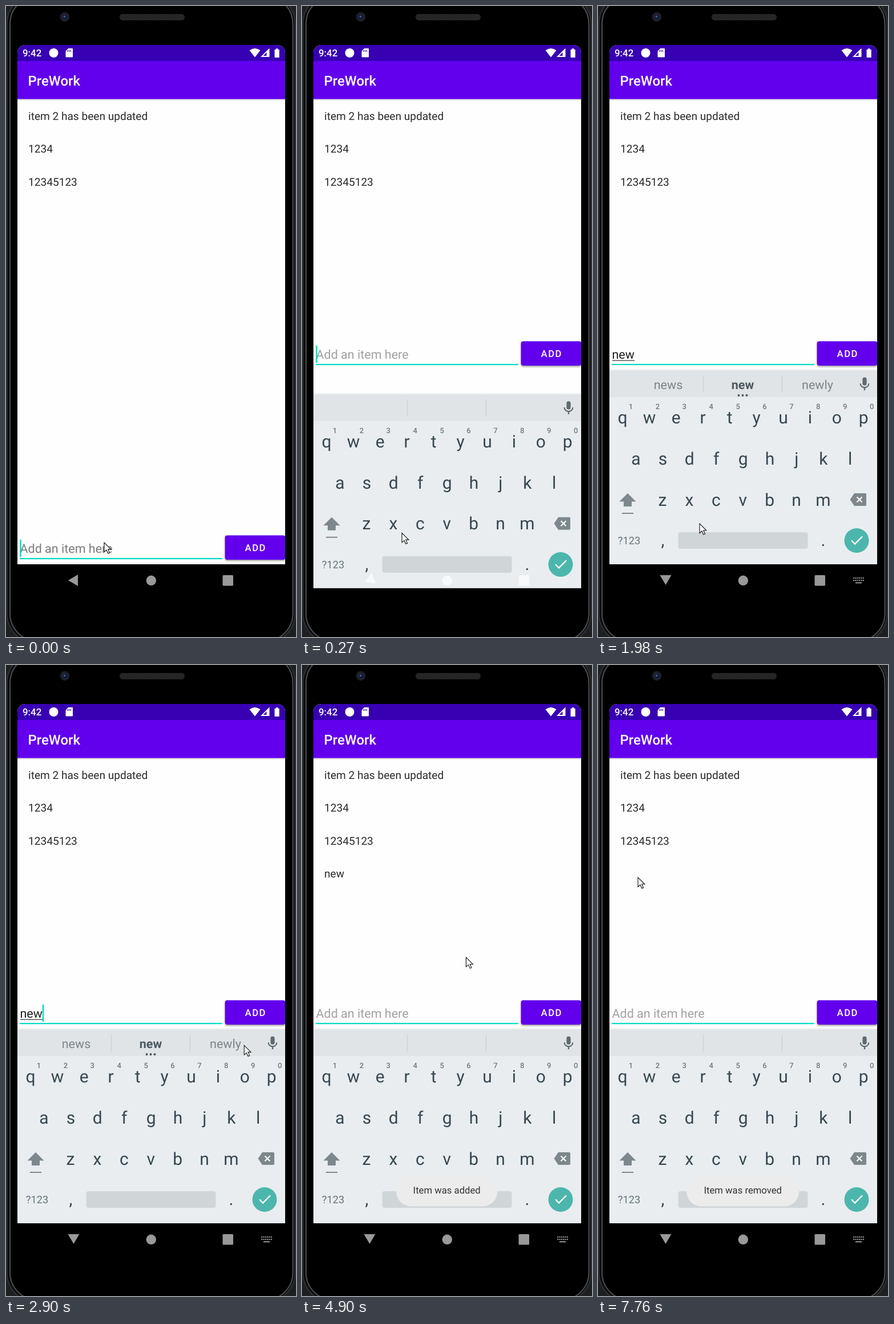
An HTML page for the animation above (8 s loop, 508 px wide and 1102 px high).

```html
<!DOCTYPE html>
<html lang="en">
<head>
<meta charset="utf-8">
<title>List app</title>
<style>
  html, body { margin: 0; width: 100%; height: 100%; overflow: hidden; background: #000; }
  svg { display: block; width: 508px; height: 1102px; font-family: Roboto, sans-serif; text-rendering: geometricPrecision; }
  .mid { text-anchor: middle; }
  .item { font-size: 19.1px; fill: #2a2a2a; }
  .key { font-size: 30px; fill: #37474f; }
  .digit { font-size: 13px; font-weight: 500; fill: #71797d; }
  .word { font-size: 21.5px; fill: #7b8488; }
  .word.best { font-weight: 700; fill: #4d5a60; }
</style>
</head>
<body>
<svg viewBox="0 0 508 1102" xmlns="http://www.w3.org/2000/svg">
  <defs>
    <clipPath id="screen"><path d="M20 1032V82a14 14 0 0 1 14-14H475a14 14 0 0 1 14 14V1032z"/></clipPath>
    <pattern id="mesh" width="4" height="4" patternUnits="userSpaceOnUse">
      <rect width="4" height="4" fill="#1b1b1b"/>
      <path d="M0 0h2v2h-2zM2 2h2v2h-2z" fill="#303030"/>
    </pattern>
    <linearGradient id="fade" x2="0" y2="1">
      <stop stop-color="#000" stop-opacity=".2"/><stop offset="1" stop-color="#000" stop-opacity="0"/>
    </linearGradient>
    <filter id="soft" x="-10%" y="-20%" width="120%" height="150%"><feGaussianBlur stdDeviation="1.5"/></filter>
  </defs>

  <!-- phone body -->
  <rect width="508" height="1102" fill="#1d1f21"/>
  <rect x="1.5" y="-22" width="505" height="1136" rx="54" fill="#0b0c0d" stroke="#303235" stroke-width="2"/>
  <rect x="7" y="-17" width="495.5" height="1126" rx="48" stroke="#4b4e52" stroke-width="2"/>
  <circle cx="103" cy="19" r="8.5" fill="#1b1c1f"/>
  <circle cx="103" cy="19" r="5" fill="#10172b" stroke="#2b3350"/>
  <circle cx="102.5" cy="18.5" r="2" fill="#40518a"/>
  <rect x="199" y="14" width="114" height="11" rx="5.5" fill="url(#mesh)"/>

  <g clip-path="url(#screen)">
    <rect x="20" y="68" width="469" height="907" fill="#fefefe"/>
    <rect x="20" y="162" width="469" height="4" fill="url(#fade)"/>
    <rect x="20" y="68" width="469" height="28" fill="#3700b3"/>
    <rect x="20" y="96" width="469" height="66.5" fill="#6200ee"/>
    <g fill="#fff">
      <text x="29" y="88" font-size="16.9" font-weight="500">9:42</text>
      <circle cx="83.5" cy="82" r="8"/>
      <path d="M109 74h7q1 0 1 1v13.5q0 1-1 1h-10.5q-1 0-1-1v-9.5z"/>
      <path d="M108 77v3M110.7 77v3M113.4 77v3" stroke="#3700b3" stroke-width="1.2"/>
      <path d="M426.5 77.5Q436 70.5 445.5 77.5L436 89.5z"/>
      <path d="M461.5 73.5v15.5h-15.5z"/>
      <path d="M456.5 81v6h-6z" fill="#3700b3"/>
      <path d="M470.5 76h2.3v-1.8h3.6v1.8h2.3v14h-8.2z"/>
      <text x="38.5" y="139" font-size="23.9" font-weight="500">PreWork</text>
    </g>
    <text class="item" x="39" y="199">item 2 has been updated</text>
    <text class="item" x="39" y="256">1234</text>
    <text class="item" x="39" y="314">12345123</text>
    <text class="item" x="39" y="371" id="added">new</text>

    <g id="entry">
      <text id="hint" x="24.5" y="616" font-size="21.5">Add an item here</text>
      <text id="typed" x="24.5" y="616" font-size="21.5" fill="#212121"></text>
      <rect id="compose" x="25" y="618.5" width="39" height="1.2" fill="#333"/>
      <rect x="24" y="625" width="355" height="2.2" fill="#03dac5"/>
      <rect id="caret" y="593" width="2.5" height="30" fill="#03dac5"/>
      <rect x="384" y="588" width="105" height="42" rx="4" opacity=".4" filter="url(#soft)"/>
      <rect id="button" x="383.5" y="585.5" width="106" height="42.5" rx="4"/>
      <text class="mid" x="437.3" y="613" font-size="16.7" font-weight="500" letter-spacing="1.5" fill="#fff">ADD</text>
    </g>
    <rect x="20" y="975" width="469" height="57"/>

    <g id="board">
      <rect x="20" y="634" width="469" height="3" fill="#f1f3f4"/>
      <rect x="20" y="636.5" width="469" height="338.5" fill="#e9edf0"/>
      <rect x="20" y="636.5" width="469" height="46.5" fill="#e0e4e7"/>
      <path d="M184.5 646v29M322.5 646v29" stroke="#c9ced1" stroke-width="1.2"/>
      <path transform="translate(452.6 646) scale(1.2)" fill="#5f6a6f" d="M12 14a3 3 0 0 0 3-3V5a3 3 0 0 0-6 0v6a3 3 0 0 0 3 3zm5.3-3a5.3 5.1 0 0 1-10.6 0H5c0 3.4 2.7 6.2 6 6.7V21h2v-3.3c3.3-.5 6-3.3 6-6.7z"/>
      <g id="words" class="mid">
        <text class="word" x="123" y="669">news</text>
        <text class="word best" x="253.5" y="669">new</text>
        <text class="word" x="384.5" y="669">newly</text>
        <path d="M246.500 680h15" stroke="#4d5a60" stroke-width="4" stroke-linecap="round" stroke-dasharray="0 7"/>
      </g>
      <g id="keys" class="mid"></g>
      <g fill="#7d888c">
        <path d="M52 851L66.500 865.500h-7.500v8.500h-14v-8.500h-7.500z"/>
        <path d="M42 885h20v2h-20z"/>
        <path d="M441.5 862l7.5-11h19q2 0 2 2v18q0 2-2 2h-19z"/>
      </g>
      <path d="M453.5 857.5l9 9m0-9l-9 9" stroke="#fff" stroke-width="2.2"/>
      <text class="mid" x="54.5" y="940" font-size="18.3" fill="#69757a">?123</text>
      <rect x="140.5" y="919" width="227" height="29" rx="4" fill="#d0d5d8"/>
      <circle cx="453" cy="933.5" r="21.5" fill="#4db6ac"/>
      <path d="M444 933.5l6 6L463 926.500" fill="none" stroke="#fff" stroke-width="2.3"/>
    </g>

    <g id="nav">
      <path id="back" d="M-9 0L8-10V10z"/>
      <circle cx="254.3" cy="1003.300" r="8.7"/>
      <rect x="379.5" y="994" width="18.5" height="18.5" rx="1.5"/>
      <g id="switch">
        <path fill="none" stroke="currentColor" stroke-width="2" d="M447 999h19M447 1003h19" stroke-dasharray="2.2 1.15"/>
        <path d="M451 1006.3h11v2h-11z"/>
      </g>
    </g>
    <g id="toast">
      <rect id="pill" y="893" height="52.5" rx="26" fill="#ebeceb"/>
      <text id="message" class="mid" x="253.7" y="923" font-size="16.7" fill="#333"></text>
    </g>
  </g>
  <path id="mouse" d="M0 0V16.500L4 13L6.800 19L9.500 18L6.800 11.800H11.800z" fill="#fff" stroke="#111" stroke-width="1.1"/>
</svg>
<script>
const LOOP = 8000, TAP = 120, OPEN = 540, TYPE = 1130, SUGGEST = 1550, ADD = 3400, REMOVE = 6630;
const BLINK = 485, PITCH = 46.9;
const $ = id => document.getElementById(id);
const set = (id, name, value) => $(id).setAttribute(name, value);
const show = (id, on) => set(id, "opacity", +on);
const within = (t, a, b) => t >= a && t < b;
const clamp = v => Math.min(1, Math.max(0, v));
const easeOut = p => 1 - (1 - p) ** 3;

// Pointer strokes: start, end, target x, target y
const strokes = [
  [200, OPEN, 178, 904], [2510, 2900, 417, 665], [2900, 3150, 432, 608],
  [ADD, 3680, 349, 582], [3680, 4650, 288, 511], [4900, 6070, 70, 371]
];

function pointerAt(t) {
  let x = 172, y = 937;
  for (const [from, to, tx, ty] of strokes) {
    const p = easeOut(clamp((t - from) / (to - from)));
    x += (tx - x) * p;
    y += (ty - y) * p;
  }
  return `translate(${x} ${y})`;
}

// The caret restarts its blink on focus, typing and clearing
function caretOn(t) {
  const since = t - (t < 1495 ? 55 : t < ADD ? 1495 : 3395);
  return since < 0 || Math.floor(since / BLINK) % 2 === 0;
}

function toastAlpha(age) {
  return clamp(Math.min(age, 2030 - age) / 270);
}

const label = (text, x, y, cls) => `<text class="${cls}" x="${x}" y="${y}">${text}</text>`;
const row = (chars, x, y, cls = "key") =>
  [...chars].map((c, i) => label(c, x + i * PITCH, y, cls)).join("");
$("keys").innerHTML =
  row("qwertyuiop", 43, 729) + row("1234567890", 57.5, 704, "digit") +
  row("asdfghjkl", 66.5, 801) + row("zxcvbnm", 113, 872.5) +
  row(",", 113.5, 943) + row(".", 394.5, 943);

function draw(t) {
  const open = t >= TAP, settled = t >= OPEN, opening = clamp(t / OPEN);
  const typing = within(t, TYPE, ADD), suggesting = within(t, SUGGEST, ADD);
  const text = typing ? "new".slice(0, 1 + Math.floor((t - TYPE) / 140)) : "";

  set("entry", "transform", `translate(0 ${open ? 0 : 339})`);
  set("hint", "fill", open ? "#a0a0a0" : "#7a7a7a");
  show("hint", !text);
  $("typed").textContent = text;
  show("compose", suggesting);
  set("caret", "x", 24.3 + (text ? $("typed").getComputedTextLength() : 0));
  show("caret", caretOn(t));
  set("button", "fill", within(t, 3270, 3680) ? "#7a2bf1" : "#6200ee");
  show("added", within(t, ADD, REMOVE));

  show("board", open);
  set("board", "transform", `translate(0 ${338 * (1 - easeOut(opening))})`);
  show("words", suggesting);

  const tint = open && !settled ? "#f7f9fa" : "#999";
  set("nav", "fill", tint);
  set("nav", "color", tint);
  const angle = open ? -90 * opening ** 2 : 0;
  set("back", "transform", `translate(${118 + opening / 2} ${1003 - opening}) rotate(${angle})`);
  show("switch", open && opening);

  const removed = t >= REMOVE, width = removed ? 197 : 177;
  $("message").textContent = removed ? "Item was removed" : "Item was added";
  set("pill", "x", 253.7 - width / 2);
  set("pill", "width", width);
  show("toast", toastAlpha(t - (removed ? REMOVE : ADD)));

  set("mouse", "transform", pointerAt(t));
}

function loop() {
  draw(performance.now() % LOOP);
  requestAnimationFrame(loop);
}
loop();
</script>
</body>
</html>
```
